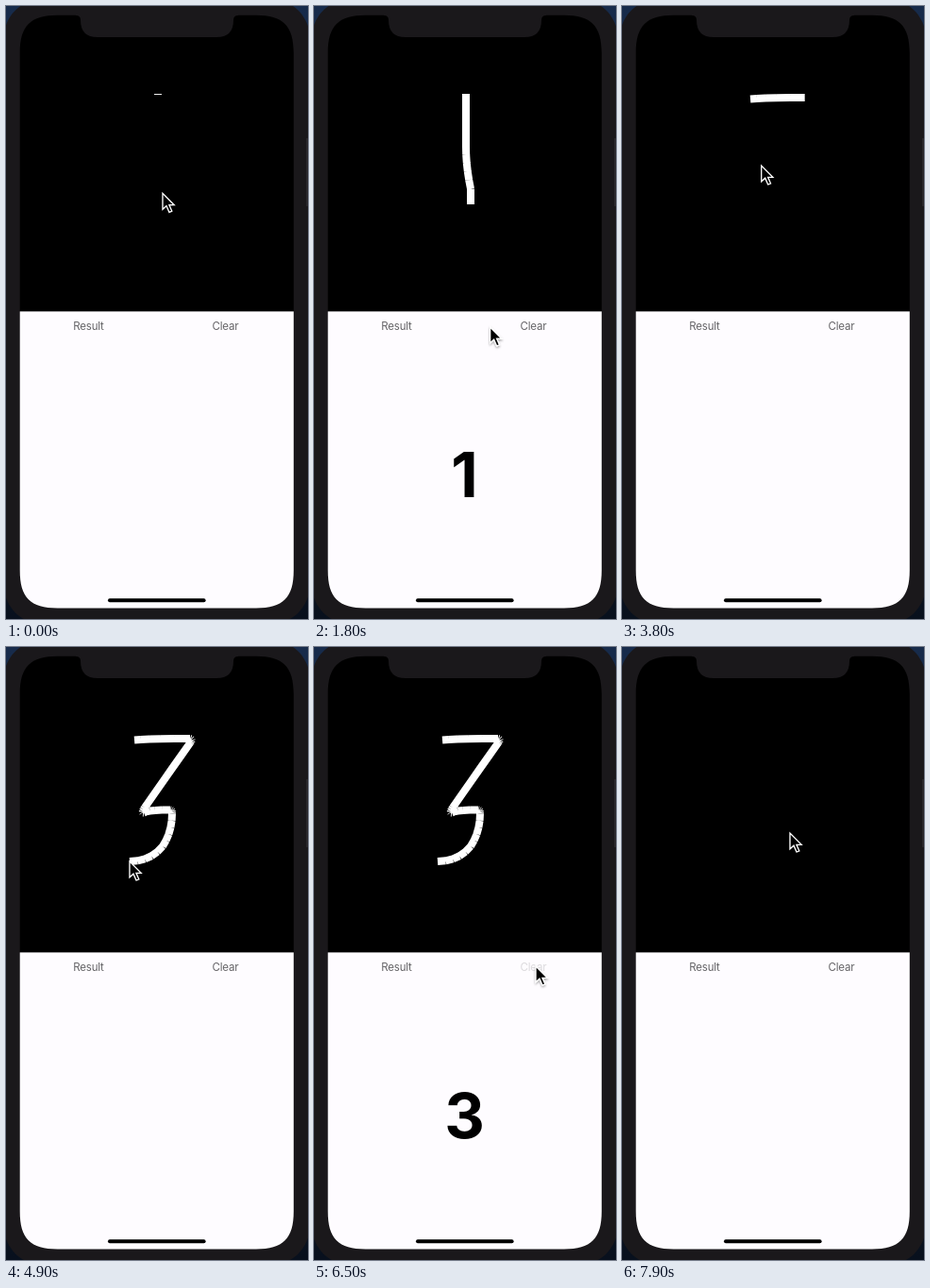
These frames come from a looping animation (320 px wide and 649 px high, 8 s). An HTML page:

```html
<!DOCTYPE html>
<html lang="en">
<head>
<meta charset="utf-8">
<title>Digit recognizer</title>
<style>
  html, body { margin: 0; width: 100%; height: 100%; overflow: hidden; background: #0b1424; }
  svg { display: block; width: 100vw; height: 100vh; }
  text { font-family: Inter, Roboto, sans-serif; text-anchor: middle; }
  .button { font-size: 11.5px; letter-spacing: -.2px; fill: #656467; }
  #digit { font-size: 66px; font-weight: 700; }
</style>
</head>
<body>
<svg viewBox="0 0 320 649">
  <defs>
    <linearGradient id="wall" x2="0" y2="1">
      <stop stop-color="#172b4b"/><stop offset="1" stop-color="#08101d"/>
    </linearGradient>
    <clipPath id="screen"><path id="glass"/></clipPath>
    <filter id="shadow" x="-50%" y="-50%" width="200%" height="200%">
      <feDropShadow dx="0" dy="1.5" stdDeviation="1.2" flood-opacity=".35"/>
    </filter>
  </defs>
  <rect width="320" height="649" fill="url(#wall)"/>
  <path id="body" fill="#1a181b"/>
  <path d="M319 140V212" stroke="#29272b" stroke-width="2"/>
  <g clip-path="url(#screen)">
    <rect x="14" y="9" width="292" height="314.4"/>
    <rect x="14" y="323.4" width="292" height="316" fill="#fefcff"/>
  </g>
  <path d="M74 9V10Q79 10 79 15Q79 33 97 33H223Q241 33 241 15Q241 10 246 10V9Z" fill="#1a181b"/>
  <rect x="108" y="627.3" width="103.6" height="3.9" rx="1.95"/>
  <path id="ink" fill="none" stroke="#fff" stroke-width="8"/>
  <text id="result" class="button" x="87.4" y="343.3">Result</text>
  <text id="clear" class="button" x="232.4" y="343.3">Clear</text>
  <text id="digit" x="159.5" y="520"></text>
  <path id="cursor" d="M0 0V16.8L4 13.2L7 20L9.8 18.8L6.9 12.3H12.2Z"
        stroke="#fff" stroke-width="1.3" filter="url(#shadow)"/>
</svg>
<script>
const $ = id => document.getElementById(id);
const LOOP = 8000, STEP = 100;
const LAG = 365;   // the ink trails the pointer
const PIECES = 5;  // straight segments per curve

// Rectangle with continuous corners of reach r
function squircle(x, y, w, h, r) {
  const c = r * .72;
  return `M${x + r} ${y}h${w - 2 * r}c${c} 0 ${r} ${r - c} ${r} ${r}v${h - 2 * r}` +
    `c0 ${c} ${c - r} ${r} ${-r} ${r}h${2 * r - w}c${-c} 0 ${-r} ${c - r} ${-r} ${-r}` +
    `v${2 * r - h}c0 ${-c} ${r - c} ${-r} ${r} ${-r}z`;
}
$('glass').setAttribute('d', squircle(14.7, 9.8, 290.1, 627.8, 40));
$('body').setAttribute('d', squircle(-5, -10, 329.5, 667, 64));

// Chain of quadratic curves: start, then control and end for each
function curve(start, ...rest) {
  const points = [start];
  for (let i = 0, a = start; i < rest.length; i += 2) {
    const [c, b] = [rest[i], rest[i + 1]];
    for (let k = 1; k <= PIECES; k++) {
      const p = k / PIECES, q = 1 - p;
      points.push(a.map((v, j) => q * q * v + 2 * p * q * c[j] + p * p * b[j]));
    }
    a = b;
  }
  return points;
}

const one = curve([161, 93], [161, 120], [161, 149], [161, 170], [166, 193.5],
  [166, 200], [166, 210]);
const three = curve([136, 98.5], [150, 97], [195, 97], [198, 97.5], [195.5, 101],
  [172, 134], [147, 170], [143, 176], [146, 175.5], [150, 172.5], [174, 172.5],
  [176, 172.5], [176, 176], [176, 196], [166, 211], [153, 227], [131, 227]);
const six = curve([159, 87], [120, 125], [119, 160], [118, 205], [178, 197]);

// The pointer either draws a line or glides to a place
const actions = [
  { from: -LAG, until: 40, line: one, erase: 2400 },
  { from: 700, until: 1150, to: [100, 334] },
  { from: 1600, until: 1900, to: [217, 342] },
  { from: 2000, until: 2200, to: [223, 332] },
  { from: 2500, until: 3000, to: three[0] },
  { from: 3200, until: 4280, line: three, erase: 6600 },
  { from: 5000, until: 5300, to: [89, 348] },
  { from: 5900, until: 6400, to: [235, 338] },
  { from: 6600, until: 7200, to: six[0] },
  { from: 7600, until: 7900, line: six, erase: LOOP },
];

const progress = (a, t) => Math.min(1, Math.max(0, (t - a.from) / (a.until - a.from)));
const smooth = p => p * p * (3 - 2 * p);
const mix = (a, b, p) => a.map((v, j) => v + (b[j] - v) * p);

// Separate butt-ended segments leave small cracks at the bends
function trace(points, share) {
  const sizes = points.slice(1).map((b, i) => Math.hypot(b[0] - points[i][0], b[1] - points[i][1]));
  let left = share * sizes.reduce((sum, s) => sum + s), d = '', tip = points[0];
  for (let i = 0; i < sizes.length && left > 0; left -= sizes[i++]) {
    tip = mix(points[i], points[i + 1], Math.min(1, left / sizes[i]));
    d += `M${points[i]}L${tip}`;
  }
  return { d, tip };
}

function pointer(t) {
  let place = one[0];
  for (const a of actions) {
    if (t < a.from) break;
    const p = progress(a, t);
    place = a.line ? trace(a.line, p).tip : mix(place, a.to, smooth(p));
  }
  return place;
}

function ink(t) {
  const a = actions.find(a => a.line && t < a.erase);
  return a ? trace(a.line, Math.max(progress(a, t - LAG), a.from < 0 ? .008 : 0)).d : '';
}

const press = (t, down, up) =>
  t < down || t >= up + 200 ? 1 : t < up ? .22 : .22 + .78 * (t - up) / 200;

function draw(t) {
  $('cursor').setAttribute('transform', `translate(${pointer(t)})`);
  $('ink').setAttribute('d', ink(t));
  $('digit').textContent = t >= 1500 && t < 2400 ? '1' : t >= 5600 && t < 6600 ? '3' : '';
  $('result').setAttribute('opacity', press(t, 1300, 1400) * press(t, 5500, 5600));
  $('clear').setAttribute('opacity', press(t, 2200, 2400) * press(t, 6400, 6600));
}

const start = performance.now();
function tick() {
  const t = (performance.now() - start) % LOOP;
  draw(Math.floor(t / STEP) * STEP);
  requestAnimationFrame(tick);
}
tick();
</script>
</body>
</html>
```
